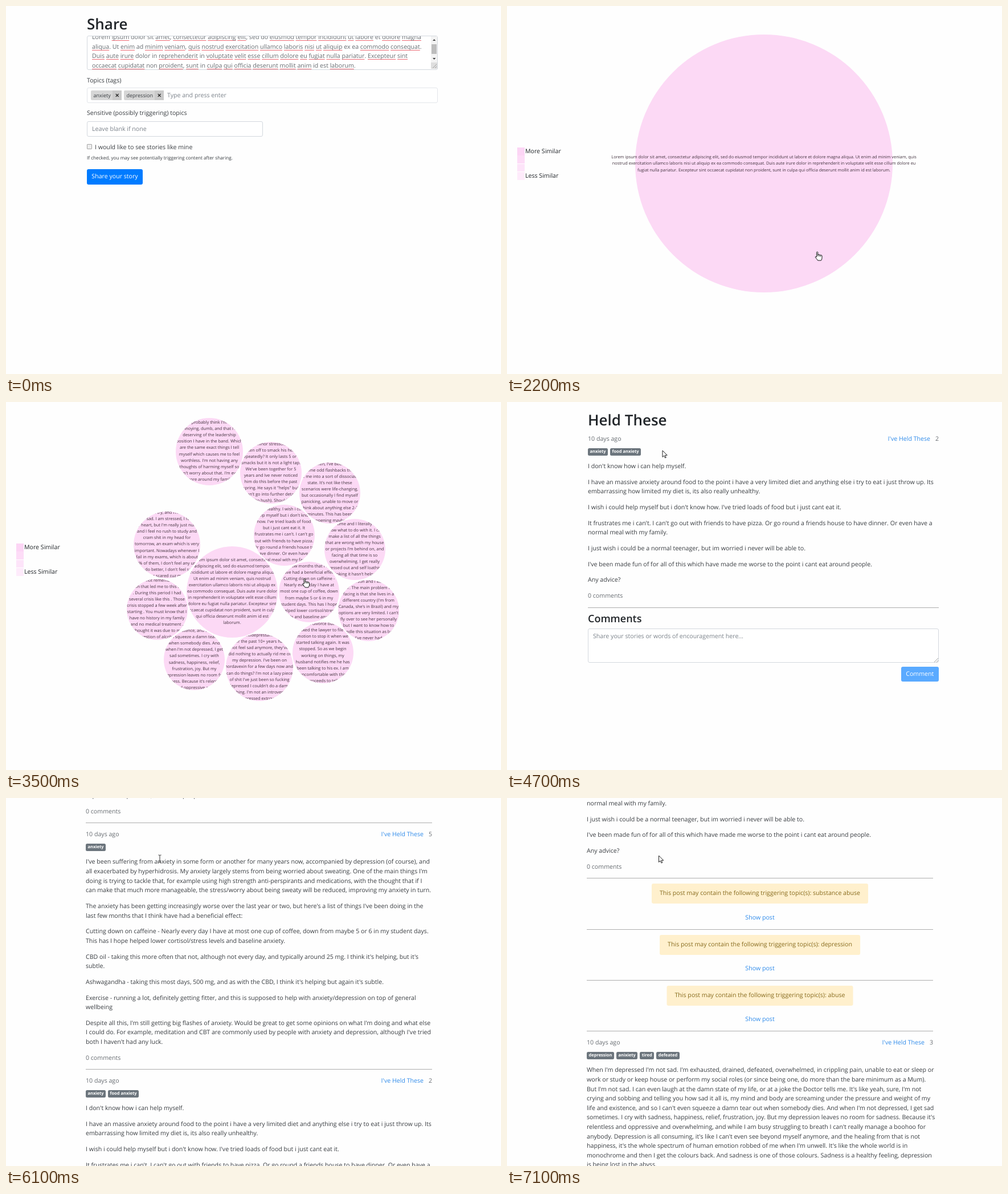
Recreate the animation shown at these times as an HTML page. Size 869x645 px, loop 7.2 s.

```html
<!DOCTYPE html>
<html lang="en">
<head>
<meta charset="utf-8">
<title>Share your story</title>
<style>
  html, body { margin: 0; width: 100%; height: 100%; overflow: hidden; background: #fefefe; }
  body { font: 10.62px/16px 'Open Sans', 'Noto Sans', sans-serif; color: #383c40; text-rendering: geometricPrecision; }
  div { position: absolute; box-sizing: border-box; white-space: pre; }
  .scene { left: 0; top: 0; width: 869px; height: 645px; overflow: hidden; }
  .field { border: 1px solid #d3d8de; border-radius: 3px; background: #fff; overflow: hidden; }
  .h1 { font-size: 26px; font-weight: 600; color: #212529; }
  .h2 { font-size: 18px; font-weight: 600; color: #212529; }
  .dark { color: #212529; }
  .hint { color: #7b828a; }
  .muted { color: #666b70; }
  .link { color: #2f8bea; }
  .button { border-radius: 3px; color: #fff; text-align: center; line-height: 26px; }
  .small { font-size: 8.2px; }
  .chip { background: #d6d6d6; border-radius: 2px; font-size: 9px; line-height: 17px; padding-left: 4.5px; }
  .chip div { right: 0; top: 0; width: 16px; height: 17px; background: #cacaca; text-align: center; font-weight: 700; color: #222; }
  .badges { display: flex; gap: 4px; }
  .badges span { background: #6c757d; color: #fff; font: 700 7.5px/12.5px 'Open Sans', 'Noto Sans', sans-serif; padding: 0 3.5px; border-radius: 2.5px; }
  .alert { transform: translateX(-50%); height: 35px; line-height: 35px; padding: 0 14px; background: #fff0cd; border-radius: 3px; color: #866a1c; }
  .bubble { border-radius: 50%; background: #fcd9f5; overflow: hidden; display: flex; align-items: center; justify-content: center;
            text-align: center; font-size: 7.38px; line-height: 11.05px; color: #43333f; }
  .bubble span { flex: none; }
  u { text-decoration: underline 1px #ec6a74; text-underline-offset: 2px; text-decoration-skip-ink: none; }
  svg { position: absolute; overflow: visible; }
</style>
</head>
<body>
<script>
const box = (x, y, w, h, cls, inner = '', css = '') =>
  `<div class="${cls}" style="left:${x}px;top:${y}px;width:${w}px;height:${h}px;${css}">${inner}</div>`;
const text = (x, mid, str, cls = '') =>
  `<div class="${cls}" style="left:${x}px;top:${mid - 8}px">${str}</div>`;
const textEndingAt = (x, mid, str, cls = '') =>
  `<div class="${cls}" style="right:${869 - x}px;top:${mid - 8}px">${str}</div>`;
const fill = (x, y, w, h, color) => box(x, y, w, h, '', '', `background:${color}`);
const shape = (x, y, d, color, css = '') =>
  `<svg width="1" height="1" style="left:${x}px;top:${y}px"><path d="${d}" fill="${color}" style="${css}"/></svg>`;
const grip = (x, y) => shape(x, y, 'M0 7L7 0M4 7L7 4', 'none', 'stroke:#999;stroke-width:.9');

const SITE = 'Held These';
const LINE = 16.6, PARA = 27.7;

// Share form
const plainWords = new Set('Lorem dolor sit sed do et Ut ad ex ea in non id est'.split(' '));
const spellcheck = str => str.replace(/\w+/g, w => plainWords.has(w) ? w : `<u>${w}</u>`);
const loremForm = [
  'Lorem ipsum dolor sit amet, consectetur adipiscing elit, sed do eiusmod tempor incididunt ut labore et dolore magna',
  'aliqua. Ut enim ad minim veniam, quis nostrud exercitation ullamco laboris nisi ut aliquip ex ea commodo consequat.',
  'Duis aute irure dolor in reprehenderit in voluptate velit esse cillum dolore eu fugiat nulla pariatur. Excepteur sint',
  'occaecat cupidatat non proident, sunt in culpa qui officia deserunt mollit anim id est laborum.'];
const chip = (x, w, str) => box(x, 148, w, 17, 'chip', `${str}<div>✕</div>`);

const shareForm = text(142, 31, 'Share', 'h1') +
  box(142, 51.5, 616, 60, 'field', loremForm.map((s, i) => text(8, 2.5 + i * LINE, spellcheck(s), 'muted')).join('')) +
  fill(746, 53, 11, 46, '#f3f3f3') + fill(747, 67, 9, 17, '#bdbdbd') + fill(746, 99, 11, 11, '#dedede') +
  shape(749, 58, 'M0 3L2.7 0L5.4 3Z', '#444') + shape(749, 91, 'M0 0L2.7 3L5.4 0Z', '#444') + grip(748.5, 101.5) +
  text(142, 131, 'Topics (tags)') +
  box(142, 143, 616, 27, 'field', '', 'border-color:#e3e6ea') + chip(149, 54, 'anxiety') + chip(207, 70, 'depression') +
  text(283, 157, 'Type and press enter', 'hint') +
  text(142, 188, 'Sensitive (possibly triggering) topics') +
  box(142, 201.5, 309, 27, 'field') + text(151, 215.5, 'Leave blank if none', 'hint') +
  box(142, 242, 9, 9, '', '', 'border:1px solid #a5a5a5;border-radius:1px;background:#eee') +
  `<div id="tick">${shape(144, 244, 'M0 2.6L2 4.7L5.4 0', 'none', 'stroke:#222;stroke-width:1.6')}</div>` +
  text(156, 247.5, 'I would like to see stories like mine') +
  text(142, 267, 'If checked, you may see potentially triggering content after sharing.', 'small') +
  box(142, 286, 98, 26.5, 'button', 'Share your story', 'background:#007bff');

// Similarity bubbles
const legend = ['#fcd5f5', '#fddcf7', '#fde4f9', '#feebfb'].map((c, i) => fill(17.5, 248 + i * 14.4, 13.5, 13.5, c)).join('') +
  text(32, 254.5, 'More Similar', 'dark') + text(32, 298, 'Less Similar', 'dark');
const bubble = ([x, y, r, str]) => box(x - r, y - r, 2 * r, 2 * r, 'bubble', `<span>${str.split('|').join('\n')}</span>`);

const loremWide = 'Lorem ipsum dolor sit amet, consectetur adipiscing elit, sed do eiusmod tempor incididunt ut labore et dolore magna aliqua. Ut enim ad minim veniam, quis|nostrud exercitation ullamco laboris nisi ut aliquip ex ea commodo consequat. Duis aute irure dolor in reprehenderit in voluptate velit esse cillum dolore eu|fugiat nulla pariatur. Excepteur sint occaecat cupidatat non proident, sunt in culpa qui officia deserunt mollit anim id est laborum.';
const single = legend + bubble([451, 276, 226, '']) +
  box(151, 260, 600, 34, 'bubble', `<span>${loremWide.split('|').join('\n')}</span>`, 'background:none;border-radius:0');

const stories = [
  [357, 86.5, 59, "s probably think I'm a|annoying, dumb, and that I'm|deserving of the leadership|position I have in the band. Which|are the same exact things I tell|myself which causes me to feel|worthless. I'm not having any|thoughts of harming myself so|don't worry about that. I'm even|more around my family"],
  [465, 124, 54, "minor stressor,|often off to smack his head|repeatedly? It only lasts 5 or 6|smacks but it is not a light tap.|We've been together for 5|years and Ive never noticed|him do this before the past|spring. He says it \"helps\" but|won't go into further details|(to hush). Should"],
  [568.5, 159, 53.5, "then, I've been|some odd flashbacks that|put me into a sort of dissociative|state. It's not like these|scenarios were life-changing,|but occasionally I find myself|panicking, unable to move or|think about anything else 2-3|minutes. This has been|happening maybe a"],
  [282.5, 250, 58.5, "I try, and I'm|so sad. I am stressed, I feel|my heart, but I'm really just numb|and I feel no rush to study and|cram shit in my head for|tomorrow, an exam which is very|important. Nowadays whenever I|fail in my exams, which is about|90% of them, I don't feel any urge|to do better, I don't feel sad|or scared cuz my"],
  [488, 233, 53.5, "unhealthy. I wish i could|help myself but i don't know|how. I've tried loads of food|but i just cant eat it. It|frustrates me i can't. I can't go|out with friends to have pizza.|Or go round a friends house to|have dinner. Or even have a|normal meal with my family."],
  [612, 258.5, 53.5, "time and I literally|know what to do with it. I can|make a list of all the things|that are wrong with my house|or projects I'm behind on, and|facing all that time is so|overwhelming. I get really|stressed out and self loathing|thinking it hasn't helped"],
  [397, 332.5, 80, "Lorem ipsum dolor sit amet, consectetur|adipiscing elit, sed do eiusmod tempor|incididunt ut labore et dolore magna aliqua.|Ut enim ad minim veniam, quis nostrud|exercitation ullamco laboris nisi ut aliquip ex|ea commodo consequat. Duis aute irure dolor|in reprehenderit in voluptate velit esse cillum|dolore eu fugiat nulla pariatur. Excepteur sint|occaecat cupidatat non proident, sunt in culpa|qui officia deserunt mollit anim id est|laborum."],
  [532, 333, 53, "last few months that I think|have had a beneficial effect:|Cutting down on caffeine -|Nearly every day I have at|most one cup of coffee, down|from maybe 5 or 6 in my|student days. This has I hope|helped lower cortisol/stress|levels and baseline anxiety."],
  [265, 363, 53.5, "do not remember|reason that led me to this crisis|. During this period I had|several crisis like this . Those|crisis stopped a few week after|starting . You must know that I|have no history in my family|and no medical treatment .|I thought it was due to my|question of alcohol"],
  [636.5, 365, 53.5, "person and I want|her. The main problem I'm|facing is that she lives in a|different country (I'm from|Canada, she's in Brazil) and my|options are very limited. I can't|fly over to see her personally|but I want to know how to|handle this situation as best|I've never had"],
  [330.5, 451.5, 53.5, "existence, and so I|even squeeze a damn tear out|when somebody dies. And|when I'm not depressed, I get|sad sometimes. I cry with|sadness, happiness, relief,|frustration, joy. But my|depression leaves no room for|sadness. Because it's relentless|and oppressive and"],
  [445, 465, 59, "antidepressants|for the past 10+ years has|not feel sad anymore, they've|did nothing to actually rid me of|my depression. I've been on|mordavexin for a few days now and I|can do things? I'm not a lazy piece|of shit I've just been so fucking|depressed I couldn't do a damn|thing. I'm not an introvert|depressed extrovert"],
  [556, 439.5, 53.5, "a divorce but I|asked the lawyer to file a|motion to stop it when we|started talking again. It was|stopped. So as we begin|working on things, my|husband notifies me he has|been talking to his ex. I am|uncomfortable with this|proceeds to tell"]];
const cluster = legend + stories.map(bubble).join('');

// Posts: "|" breaks a line inside a paragraph
const loremPost = { age: 'a few seconds ago', likes: 0, tags: ['anxiety', 'depression'], body: [
  'Lorem ipsum dolor sit amet, consectetur adipiscing elit, sed do eiusmod tempor incididunt ut labore et dolore magna|aliqua. Ut enim ad minim veniam, quis nostrud exercitation ullamco laboris nisi ut aliquip ex ea commodo consequat. Duis|aute irure dolor in reprehenderit in voluptate velit esse cillum dolore eu fugiat nulla pariatur. Excepteur sint occaecat|cupidatat non proident, sunt in culpa qui officia deserunt mollit anim id est laborum.'] };
const caffeinePost = { likes: 5, tags: ['anxiety'], body: [
  "I've been suffering from anxiety in some form or another for many years now, accompanied by depression (of course), and|all exacerbated by hyperhidrosis. My anxiety largely stems from being worried about sweating. One of the main things I'm|doing is trying to tackle that, for example using high strength anti-perspirants and medications, with the thought that if I|can make that much more manageable, the stress/worry about being sweaty will be reduced, improving my anxiety in turn.",
  "The anxiety has been getting increasingly worse over the last year or two, but here's a list of things I've been doing in the|last few months that I think have had a beneficial effect:",
  'Cutting down on caffeine - Nearly every day I have at most one cup of coffee, down from maybe 5 or 6 in my student days.|This has I hope helped lower cortisol/stress levels and baseline anxiety.',
  "CBD oil - taking this more often that not, although not every day, and typically around 25 mg. I think it's helping, but it's|subtle.",
  "Ashwagandha - taking this most days, 500 mg, and as with the CBD, I think it's helping but again it's subtle.",
  'Exercise - running a lot, definitely getting fitter, and this is supposed to help with anxiety/depression on top of general|wellbeing',
  "Despite all this, I'm still getting big flashes of anxiety. Would be great to get some opinions on what I'm doing and what else|I could do. For example, meditation and CBT are commonly used by people with anxiety and depression, although I've tried|both I haven't had any luck."] };
const foodPost = { likes: 2, tags: ['anxiety', 'food anxiety'], body: [
  "I don't know how i can help myself.",
  'I have an massive anxiety around food to the point i have a very limited diet and anything else i try to eat i just throw up. Its|embarrassing how limited my diet is, its also really unhealthy.',
  "I wish i could help myself but i don't know how. I've tried loads of food but i just cant eat it.",
  "It frustrates me i can't. I can't go out with friends to have pizza. Or go round a friends house to have dinner. Or even have a|normal meal with my family.",
  'I just wish i could be a normal teenager, but im worried i never will be able to.',
  "I've been made fun of for all of this which have made me worse to the point i cant eat around people.",
  'Any advice?'] };
const sadPost = { likes: 3, tags: ['depression', 'anixiety', 'tired', 'defeated'], body: [
  "When I'm depressed I'm not sad. I'm exhausted, drained, defeated, overwhelmed, in crippling pain, unable to eat or sleep or|work or study or keep house or perform my social roles (or since being one, do more than the bare minimum as a Mum).|But I'm not sad. I can even laugh at the damn state of my life, or at a joke the Doctor tells me. It's like yeah, sure, I'm not|crying and sobbing and telling you how sad it all is, my mind and body are screaming under the pressure and weight of my|life and existence, and so I can't even squeeze a damn tear out when somebody dies. And when I'm not depressed, I get sad|sometimes. I cry with sadness, happiness, relief, frustration, joy. But my depression leaves no room for sadness. Because it's|relentless and oppressive and overwhelming, and while I am busy struggling to breath I can't really manage a boohoo for|anybody. Depression is all consuming, it's like I can't even see beyond myself anymore, and the healing from that is not|happiness, it's the whole spectrum of human emotion robbed of me when I'm unwell. It's like the whole world is in|monochrome and then I get the colours back. And sadness is one of those colours. Sadness is a healthy feeling, depression|is being lost in the abyss."] };

// Lays out one post whose date line is at y; ruleY is where its closing rule goes.
function layPost(x, right, y, { age = '10 days ago', likes, tags, body }) {
  let html = text(x, y, age, 'muted') + textEndingAt(right - 15, y, `I've ${SITE}`, 'link') + textEndingAt(right, y, likes, 'muted') +
    `<div class="badges" style="left:${x}px;top:${y + 16}px">${tags.map(t => `<span>${t}</span>`).join('')}</div>`;
  y += 48;
  for (const para of body) {
    const lines = para.split('|');
    lines.forEach((s, i) => html += text(x, y + i * LINE, s));
    y += (lines.length - 1) * LINE + PARA;
  }
  const ruleY = y + 19.4;
  html += text(x, y, '0 comments', 'muted') + fill(x, ruleY, right - x, 1, '#adadad');
  return { html, ruleY };
}

const postPage = text(142, 31, SITE, 'h1') + layPost(142, 758, 65, foodPost).html +
  text(142, 380, 'Comments', 'h2') + box(142, 397, 616, 60, 'field') +
  text(151, 410.5, 'Share your stories or words of encouragement here...', 'hint') + grip(750, 448.5) +
  box(691.5, 463.5, 66.5, 26.5, 'button', 'Comment', 'background:#5aaaff');

function layFeed() {
  let html = text(140, 31, SITE, 'h1'), y = 73;
  const add = post => {
    const part = layPost(140, 748, y, post);
    html += part.html;
    y = part.ruleY + 21;
  };
  [loremPost, caffeinePost, foodPost].forEach(add);
  for (const topic of ['substance abuse', 'depression', 'abuse']) {
    const rule = y - 21;
    html += `<div class="alert" style="left:444px;top:${rule + 10}px">This post may contain the following triggering topic(s): ${topic}</div>` +
      `<div class="link" style="left:444px;top:${rule + 61.5}px;transform:translateX(-50%)">Show post</div>` +
      fill(140, rule + 89.4, 608, 1, '#adadad');
    y += 89.4;
  }
  add(sadPost);
  return `<div id="feed" style="left:0;top:0;width:869px;height:1600px">${html}</div>`;
}

const cursors = {
  arrow: shape(0, 0, 'M0 0V11.5L2.7 9L4.5 13L6.3 12.2L4.5 8.3H8.2Z', '#fff', 'stroke:#222;stroke-width:1'),
  hand: shape(-4, 0, 'M2.6 10V1.5Q3.6-.6 4.7 1.5V6Q6 4.6 7.2 6.2Q8.5 5.2 9.6 6.8Q11 6 12 7.6V11.5Q12 14 10.4 16H4.6Q3 13.5 .3 10.5Q-.2 8.4 2.6 10ZM4.7 6V8.5M7.2 6.2V9M9.6 6.8V9.3', '#fff', 'stroke:#111;stroke-width:1'),
  beam: shape(0, -6, 'M-2.5 0H-.8L0 .8L.8 0H2.5M0 .8V12.2M-2.5 13H-.8L0 12.2L.8 13H2.5', 'none', 'stroke:#333;stroke-width:1')
};

const scenes = [[0, shareForm], [1700, single], [2900, cluster], [3900, postPage], [5500, layFeed()]];
document.body.innerHTML = scenes.map(([, html]) => `<div class="scene">${html}</div>`).join('') +
  Object.entries(cursors).map(([kind, html]) => `<div id="${kind}" style="left:0;top:0">${html}</div>`).join('');
const sceneNodes = [...document.querySelectorAll('.scene')];
const byId = id => document.getElementById(id);

// time, x, y, cursor shape from then on
const pointer = [
  [100, 826, 575, 'arrow'], [700, 276.5, 252, 'arrow'], [1100, 276.5, 252, 'arrow'], [1400, 196, 297, 'hand'],
  [1700, 196, 297, 'arrow'], [1900, 400, 375, 'hand'], [2100, 545, 430, 'hand'], [2900, 545, 430, 'hand'],
  [3400, 524.5, 309, 'hand'], [3500, 524.5, 309, 'hand'], [3800, 490, 236, 'hand'], [3900, 480, 230, 'arrow'],
  [4400, 273, 85, 'arrow'], [5500, 273, 85, 'arrow'], [5900, 270, 106, 'beam'], [6400, 270, 106, 'arrow'],
  [6600, 266.5, 101, 'arrow'], [7200, 266.5, 101, 'arrow']];
const ramp = (t, a, b) => Math.min(1, Math.max(0, (t - a) / (b - a)));
const ease = p => p * p * (3 - 2 * p);

function draw() {
  const t = Math.floor(performance.now() % 7200 / 100) * 100;
  const current = scenes.findLastIndex(([start]) => t >= start);
  sceneNodes.forEach((node, i) => node.style.display = i === current ? '' : 'none');
  byId('tick').style.display = t >= 800 ? '' : 'none';
  const scroll = 174.5 * ramp(t, 6000, 6100) + 650.5 * ramp(t, 6100, 6600);
  byId('feed').style.top = -scroll + 'px';

  const k = pointer.findLastIndex(([start]) => t >= start);
  for (const kind in cursors) byId(kind).style.display = k >= 0 && pointer[k][3] === kind ? '' : 'none';
  if (k >= 0) {
    const [t0, x0, y0, kind] = pointer[k], [t1, x1, y1] = pointer[k + 1];
    const p = ease(ramp(t, t0, t1));
    byId(kind).style.transform = `translate(${x0 + (x1 - x0) * p}px, ${y0 + (y1 - y0) * p}px)`;
  }
  requestAnimationFrame(draw);
}
draw();
</script>
</body>
</html>
```
